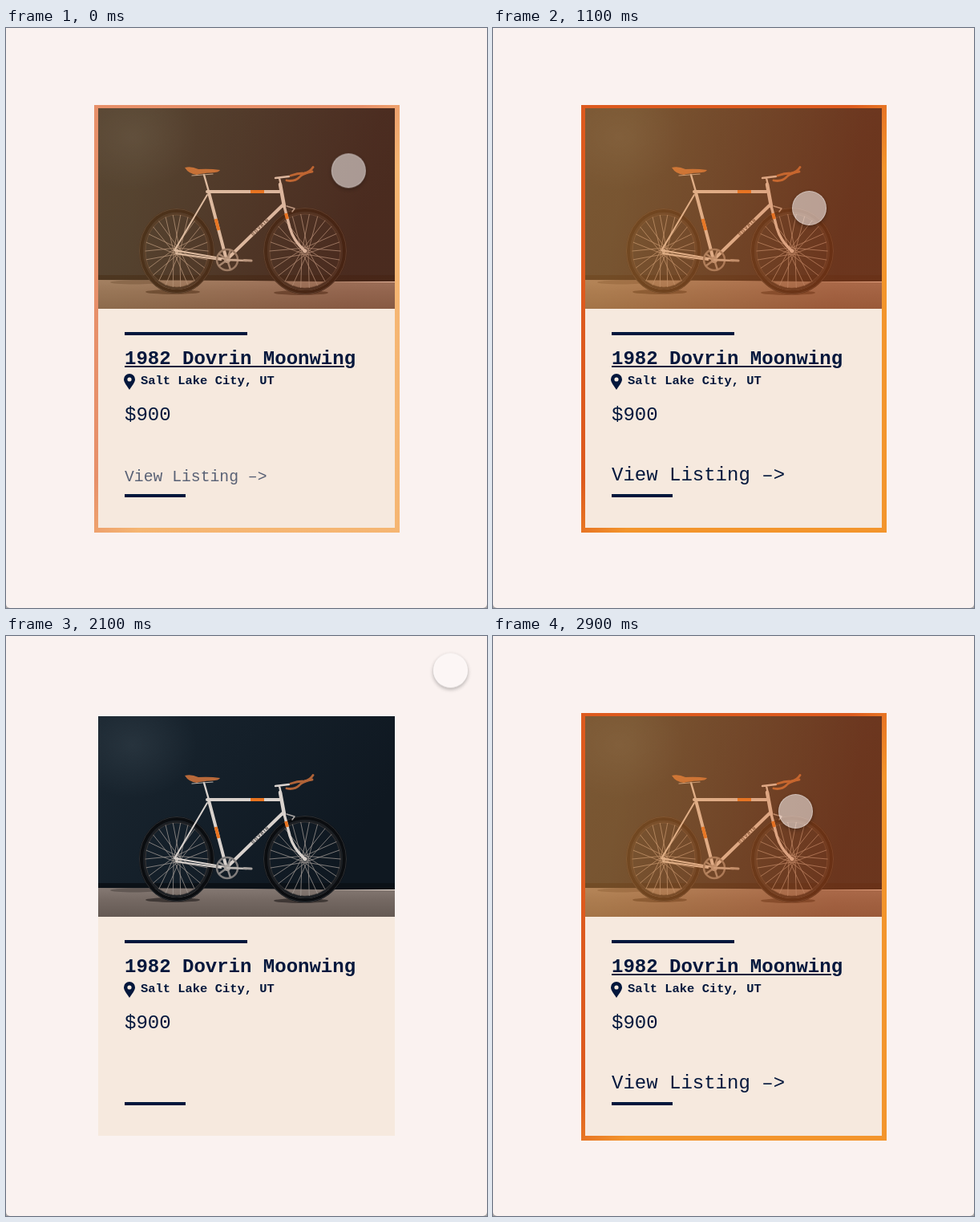
These frames come from a looping animation (600x723 px, 3000 ms). An HTML page:

```html
<!DOCTYPE html>
<html lang="en">
<head>
<meta charset="utf-8">
<title>Listing card</title>
<style>
@property --p { syntax: "<number>"; inherits: true; initial-value: 0; }

html, body { margin: 0; width: 100%; height: 100%; overflow: hidden; background: #aaa6a5; }

.stage {
  --navy: #03173c;
  position: relative; width: 600px; height: 723px; overflow: hidden;
  background: #faf2f0; border-radius: 0 0 5px 5px;
  color: var(--navy);
  font: 24px/24px "Liberation Mono", monospace;
  animation: hover 3s linear infinite;
}
.stage > * { position: absolute; white-space: pre; }

.frame {
  left: 109.5px; top: 95.5px; width: 381px; height: 532.5px;
  background: linear-gradient(to bottom right, #dd5a1e 44%, #f3952c 57%);
  opacity: var(--p);
  animation: flip 3s step-end infinite;
}
.card { left: 115px; top: 100px; width: 370px; height: 523px; background: #f6e9de; }
.photo, .tint { left: 115px; top: 100px; width: 370px; height: 250px; }
.tint {
  background: linear-gradient(100deg, #f09438 15%, #dc5a1a 85%);
  opacity: calc(.45 * var(--p));
}

.bar { left: 148px; height: 4.5px; background: var(--navy); }
.title {
  left: 148px; top: 401px; font-weight: 700;
  text-decoration: underline 2px; text-underline-offset: 2px;
  animation: underline 3s step-end infinite;
}
.place { left: 168px; top: 432px; font: 700 15.45px/16px "Liberation Mono", monospace; }
.pin { left: 147px; top: 431px; }
.price { left: 148px; top: 471px; }
.link {
  left: 148px; top: 546px;
  opacity: var(--p);
  transform: scale(calc(.5 + .5 * var(--p)));
  transform-origin: 0 22px;
}

.dot {
  left: -21.5px; top: -21.5px; width: 43px; height: 43px; box-sizing: border-box;
  border-radius: 50%; border: 1px solid #ffffff50;
  background: #fdfafa88;
  box-shadow: 0 2px 5px #0000004d;
  animation: roam 3s linear infinite;
}

@keyframes hover {
  0% { --p: .64; animation-timing-function: ease-out; }
  6.7% { --p: 1; }
  51.7% { --p: 1; animation-timing-function: ease; }
  60.2% { --p: 0; }
  74.1% { --p: 0; animation-timing-function: ease; }
  84.1%, 100% { --p: 1; }
}
@keyframes underline {
  0%, 74.1%, 100% { text-decoration-color: #03173c; }
  51.7% { text-decoration-color: transparent; }
}
@keyframes flip {
  0%, 60.2%, 100% { transform: none; }
  51.7% { transform: rotate(180deg); }
}
@keyframes roam {
  0% { transform: translate(427px, 177px); animation-timing-function: ease-out; }
  8%, 44.7% { transform: translate(394px, 224px); animation-timing-function: ease-in-out; }
  57%, 70.7% { transform: translate(554px, 42.5px); animation-timing-function: ease-in; }
  76.6% { transform: translate(428.5px, 160px); animation-timing-function: ease-out; }
  81%, 100% { transform: translate(377px, 218px); }
}
</style>
</head>
<body>
<div class="stage">
  <div class="frame"></div>
  <div class="card"></div>

  <svg class="photo" viewBox="115 100 370 250" fill="none" stroke-linecap="round" stroke-linejoin="round">
    <defs>
      <linearGradient id="wall" y2=".4">
        <stop stop-color="#1a2630"/><stop offset=".5" stop-color="#141f29"/><stop offset="1" stop-color="#0f1821"/>
      </linearGradient>
      <linearGradient id="floor" x2="0" y2="1">
        <stop stop-color="#857973"/><stop offset=".4" stop-color="#756963"/><stop offset="1" stop-color="#645953"/>
      </linearGradient>
      <radialGradient id="glow">
        <stop stop-color="#36434d" stop-opacity=".5"/><stop offset="1" stop-color="#36434d" stop-opacity="0"/>
      </radialGradient>
    </defs>
    <path fill="url(#wall)" d="M115 100h370v215H115z"/>
    <ellipse fill="url(#glow)" cx="158" cy="136" rx="80" ry="66"/>
    <path fill="#0b1117" d="M115 308h370v8H115z"/>
    <path fill="url(#floor)" d="M115 314l190 1 180 2v33H115z"/>
    <g fill="#2a2423" opacity=".7">
      <ellipse cx="208" cy="329" rx="34" ry="3"/>
      <ellipse cx="368" cy="330" rx="34" ry="3"/>
      <ellipse cx="160" cy="317" rx="30" ry="2.5" opacity=".5"/>
    </g>

    <g id="wheels"></g>

    <!-- frame tubes -->
    <g stroke="#d9d2cd">
      <path stroke-width="2" d="M251 208L211 276M210 277L274 288M212 281L268 289"/>
      <path stroke-width="4" d="M253 205L274 285M251 204H341M345 221L279 285"/>
      <path stroke-width="4.5" d="M342 195L347 222"/>
      <path stroke-width="3.4" d="M347 222L354 249Q359 266 373 278"/>
      <path stroke-width="2.4" d="M247 183L253 204M336 187L353 185M341 187L343 196"/>
    </g>
    <path stroke="#e8731f" stroke-width="4" stroke-linecap="butt" d="M305 204H322M261.6 238L265.3 252M349 231L351 238"/>
    <text transform="translate(308 259) rotate(-44)" fill="#2b2b2e" font-family="Liberation Sans, sans-serif" font-size="5" font-weight="700" letter-spacing="1.6">DOVRIN</text>

    <!-- saddle and handlebar -->
    <path fill="#b8693a" d="M223 174Q231 172 240 176Q254 175 267 177Q266 180 256 180.500Q244 181 238 183Q228 182 223 174Z"/>
    <path stroke="#b9b3ae" stroke-width="1.2" d="M232 184L258 182"/>
    <g stroke="#b06338" stroke-width="2.8">
      <path d="M350 190Q360 192 366 186Q370 181 382 179"/>
      <path d="M355 184Q364 181 372 181Q379 180 383 173.500"/>
    </g>
    <path stroke="#aaa5a2" stroke-width="1.5" d="M350 222L360 225L357 229"/>

    <!-- crank -->
    <g stroke="#8d8a89">
      <circle cx="276" cy="289" r="13" stroke-width="2.5" stroke="#7f7c7b"/>
      <path id="crank" stroke-width="2.5"/>
      <circle cx="276" cy="289" r="4" fill="#a5a09d" stroke="none"/>
      <path stroke="#bdb8b4" stroke-width="2.4" d="M276 289L300 290"/>
      <path stroke="#a5a09d" stroke-width="3.2" d="M297 289.500L306 290"/>
    </g>
  </svg>

  <div class="tint"></div>
  <div class="bar" style="top:378.5px;width:153px"></div>
  <div class="title">1982 Dovrin Moonwing</div>
  <svg class="pin" width="14" height="20" viewBox="0 0 14 20">
    <path fill="#03173c" fill-rule="evenodd" d="M7 0A7 7 0 0 0 0 7C0 11 4 15 7 20C10 15 14 11 14 7A7 7 0 0 0 7 0ZM7 4.400A2.600 2.600 0 1 1 7 9.600A2.600 2.600 0 1 1 7 4.400Z"/>
  </svg>
  <div class="place">Salt Lake City, UT</div>
  <div class="price">$900</div>
  <div class="link">View Listing –&gt;</div>
  <div class="bar" style="top:580.5px;width:76px"></div>
  <div class="dot"></div>
</div>

<script>
const TAU = Math.PI * 2;

// Spokes leave the hub at a slant, alternating sides.
function spokes(x, y, hub, rx, ry, count, slant) {
  let d = "";
  for (let i = 0; i < count; i++) {
    const a = i / count * TAU, b = a + (i % 2 ? slant : -slant);
    d += `M${x + hub * Math.cos(b)} ${y + hub * Math.sin(b)}L${x + rx * Math.cos(a)} ${y + ry * Math.sin(a)}`;
  }
  return d;
}

function wheel(x, y, rx, ry) {
  const ring = (inset, color, width) =>
    `<ellipse cx="${x}" cy="${y}" rx="${rx - inset}" ry="${ry - inset}" stroke="${color}" stroke-width="${width}"/>`;
  return ring(2.5, "#0b0d10", 5) + ring(0.5, "#2c2f33", 1) + ring(6.5, "#1c1f23", 3) + ring(8, "#4a4644", 0.6) +
    `<path stroke="#a39b96" stroke-width=".75" d="${spokes(x, y, 4, rx - 8, ry - 8, 26, 1.2)}"/>` +
    `<circle cx="${x}" cy="${y}" r="2.8" fill="#bdb6b0"/>`;
}

document.getElementById("wheels").innerHTML = wheel(213, 278, 47, 53) + wheel(373, 278, 52, 54);
document.getElementById("crank").setAttribute("d", spokes(276, 289, 3, 12, 12, 5, 0));
</script>
</body>
</html>
```
